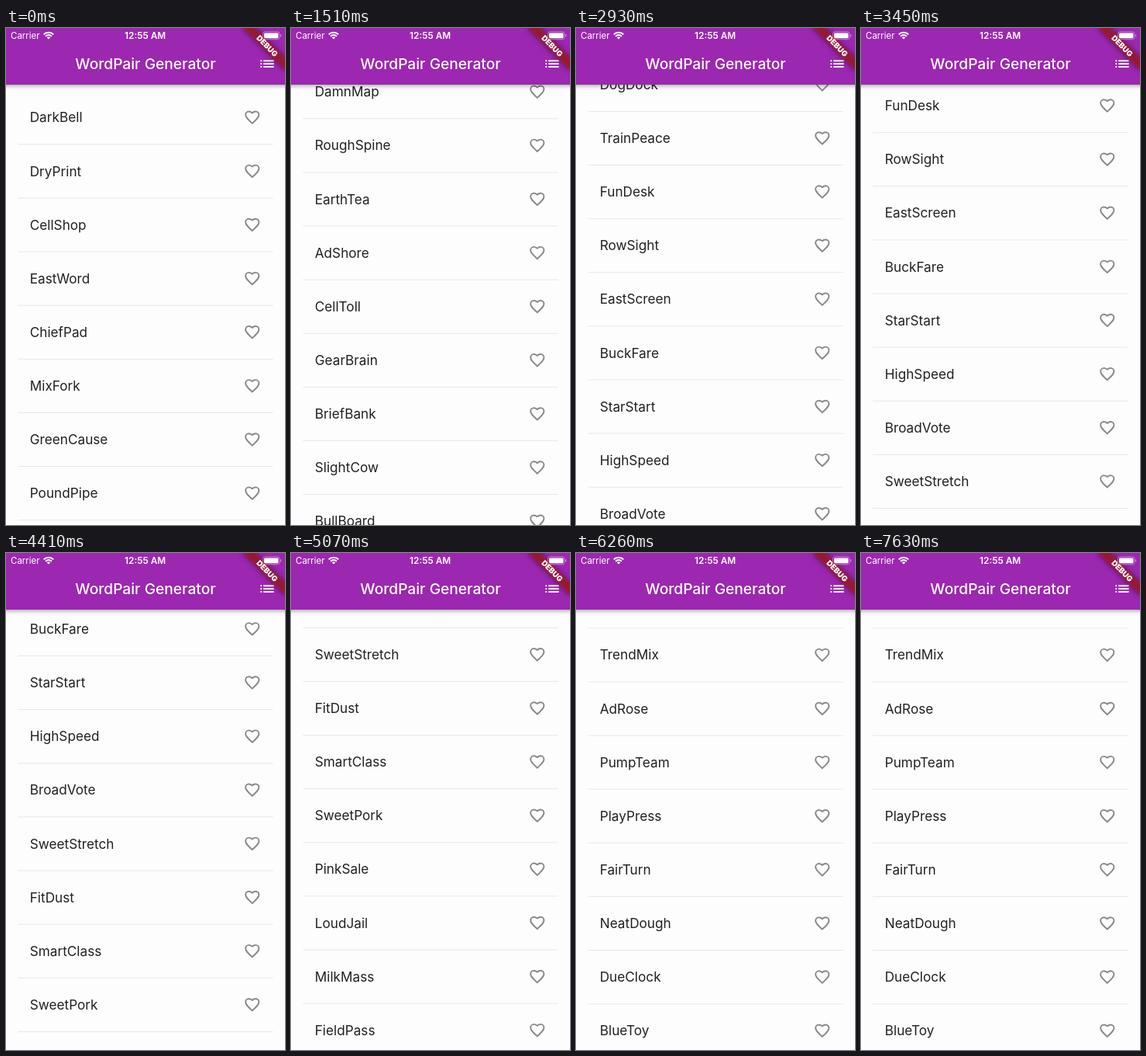
Write an HTML page with a canvas that moves like this. It is 360x640 px and loops after 8000 ms.

```html
<!DOCTYPE html>
<html lang="en">
<head>
<meta charset="utf-8">
<title>WordPair Generator</title>
<style>
  html, body { margin: 0; width: 100%; height: 100%; overflow: hidden; background: #fdfdfd; }
  canvas { display: block; width: 100vw; height: 100vh; }
</style>
</head>
<body>
<canvas id="stage"></canvas>
<script>
const W = 360, H = 640, LOOP = 8000;
const U = 0.96;               // one layout unit in stage pixels
const ROW = 72 * U, FIRST = 120 * U, BAR = 76 * U;
const STEP = 115.4;           // usual time between screen refreshes
const FONT = 'Inter, Roboto, sans-serif';

const words = `DarkBell DryPrint CellShop EastWord ChiefPad MixFork GreenCause PoundPipe
  DamnMap RoughSpine EarthTea AdShore CellToll GearBrain BriefBank SlightCow BullBoard
  DogDock TrainPeace FunDesk RowSight EastScreen BuckFare StarStart HighSpeed BroadVote
  SweetStretch FitDust SmartClass SweetPork PinkSale LoudJail MilkMass FieldPass TrendMix
  AdRose PumpTeam PlayPress FairTurn NeatDough DueClock BlueToy`.split(/\s+/);

// Three swipes with rests between them: { t: ms, y: scroll offset }
const key = (t, y) => ({ t, y });
const keys = [
  key(0, 0), key(400, 0), key(500, 30), key(1070, 540), key(1510, 586),
  key(1620, 586), key(1720, 606), key(2930, 1217.5), key(3450, 1328.5),
  key(3740, 1328.5), key(3840, 1346), key(4410, 1538), key(5700, 2093.8), key(6260, 2334),
  key(LOOP, 2334)
];

const slope = i => (keys[i + 1].y - keys[i].y) / (keys[i + 1].t - keys[i].t);

// Harmonic mean keeps the curve monotone
function tangent(i) {
  if (i === 0 || i === keys.length - 1) return 0;
  const a = slope(i - 1), b = slope(i);
  return a * b > 0 ? 2 * a * b / (a + b) : 0;
}

// Smooth curve through the keys, held between even refreshes
function scrollAt(t) {
  const i = keys.findIndex((k, n) => n === keys.length - 2 || t < keys[n + 1].t);
  const a = keys[i], b = keys[i + 1], d = b.t - a.t;
  const n = Math.max(1, Math.round(d / STEP));
  const s = Math.floor((t - a.t) / d * n) / n, r = 1 - s;
  return a.y * (1 + 2 * s) * r * r + b.y * s * s * (3 - 2 * s)
       + d * s * r * (tangent(i) * r - tangent(i + 1) * s);
}

const canvas = document.getElementById('stage');
const ctx = canvas.getContext('2d');
const dpr = window.devicePixelRatio || 1;
canvas.width = W * dpr;
canvas.height = H * dpr;

function text(str, x, y, font, color, align = 'left') {
  ctx.font = `${font} ${FONT}`;
  ctx.fillStyle = color;
  ctx.textAlign = align;
  ctx.fillText(str, x, y);
}

// Runs paint in layout units around a centre
function icon(cx, cy, paint) {
  ctx.save();
  ctx.translate(cx, cy);
  ctx.scale(U, U);
  paint();
  ctx.restore();
}

function heart() {
  ctx.beginPath();
  ctx.moveTo(0, 8);
  ctx.bezierCurveTo(-5.8, 2.8, -9, -0.2, -9, -3.5);
  ctx.bezierCurveTo(-9, -6, -7, -8, -4.5, -8);
  ctx.bezierCurveTo(-2.6, -8, -0.8, -7.1, 0, -5.7);
  ctx.bezierCurveTo(0.8, -7.1, 2.6, -8, 4.5, -8);
  ctx.bezierCurveTo(7, -8, 9, -6, 9, -3.5);
  ctx.bezierCurveTo(9, -0.2, 5.8, 2.8, 0, 8);
  ctx.closePath();
  ctx.lineWidth = 2;
  ctx.miterLimit = 1.6;
  ctx.strokeStyle = 'rgba(0,0,0,.46)';
  ctx.stroke();
}

function menu() {
  ctx.fillStyle = '#fff';
  for (let y = -5; y <= 3; y += 4) {
    ctx.fillRect(-9, y, 2, 2);
    ctx.fillRect(-5, y, 14, 2);
  }
}

function drawList(scroll) {
  words.forEach((word, i) => {
    const y = FIRST + ROW * i - scroll;
    if (y < 20 || y > H + 40) return;
    text(word, 32 * U, y + 6.2, '400 17.2px', 'rgba(0,0,0,.87)');
    icon(331 * U, y, heart);
    ctx.fillStyle = 'rgba(0,0,0,.09)';
    ctx.fillRect(16 * U, y + ROW / 2 - 0.4, W - 32 * U, 1);
  });
}

function drawWifi() {
  const left = -Math.PI * 0.75, right = -Math.PI * 0.25;
  ctx.fillStyle = '#fff';
  for (let i = 0; i < 3; i++) {
    const outer = 3.2 + 3.35 * i, inner = i ? outer - 2 : 0;
    ctx.beginPath();
    ctx.arc(55, 14.6, outer, left, right);
    ctx.arc(55, 14.6, inner, right, left, true);
    ctx.fill();
  }
}

function drawBattery() {
  ctx.strokeStyle = 'rgba(255,255,255,.4)';
  ctx.lineWidth = 1;
  ctx.beginPath();
  ctx.roundRect(331.5, 4.9, 21.4, 9.8, 2.6);
  ctx.stroke();
  ctx.fillStyle = '#fff';
  ctx.beginPath();
  ctx.roundRect(333, 6.4, 18.4, 6.8, 1.4);
  ctx.fill();
  ctx.fillStyle = 'rgba(255,255,255,.45)';
  ctx.fillRect(354, 8.2, 1.2, 3.2);
}

function drawRibbon() {
  const band = color => {
    ctx.fillStyle = color;
    ctx.fillRect(-40 * U, 28 * U, 80 * U, 12 * U);
  };
  ctx.save();
  ctx.translate(W, 0);
  ctx.rotate(Math.PI / 4);
  ctx.filter = `blur(${3.8 * dpr}px)`;
  band('rgba(0,0,0,.5)');
  ctx.filter = 'none';
  band('rgba(183,28,28,.63)');
  text('DEBUG', 0, 34 * U + 3.5, '900 9.8px', '#fff', 'center');
  ctx.restore();
}

function drawBar() {
  ctx.save();
  ctx.shadowColor = 'rgba(0,0,0,.42)';
  ctx.shadowBlur = 6 * dpr;
  ctx.shadowOffsetY = 1.5 * dpr;
  ctx.fillStyle = '#9c27b0';
  ctx.fillRect(-10, -10, W + 20, BAR + 10);
  ctx.restore();
  text('WordPair Generator', W / 2, 53, '500 19.2px', '#fff', 'center');
  icon(351 * U, 48 * U, menu);
  drawRibbon();
  text('Carrier', 6, 14, '400 11.5px', '#fff');
  drawWifi();
  text('12:55 AM', 179.6, 14, '600 11.8px', '#fff', 'center');
  drawBattery();
}

function draw(t) {
  ctx.setTransform(dpr, 0, 0, dpr, 0, 0);
  ctx.fillStyle = '#fdfdfd';
  ctx.fillRect(0, 0, W, H);
  drawList(scrollAt(t));
  drawBar();
}

const start = performance.now();
function loop() {
  draw((performance.now() - start) % LOOP);
  requestAnimationFrame(loop);
}
loop();
</script>
</body>
</html>
```
